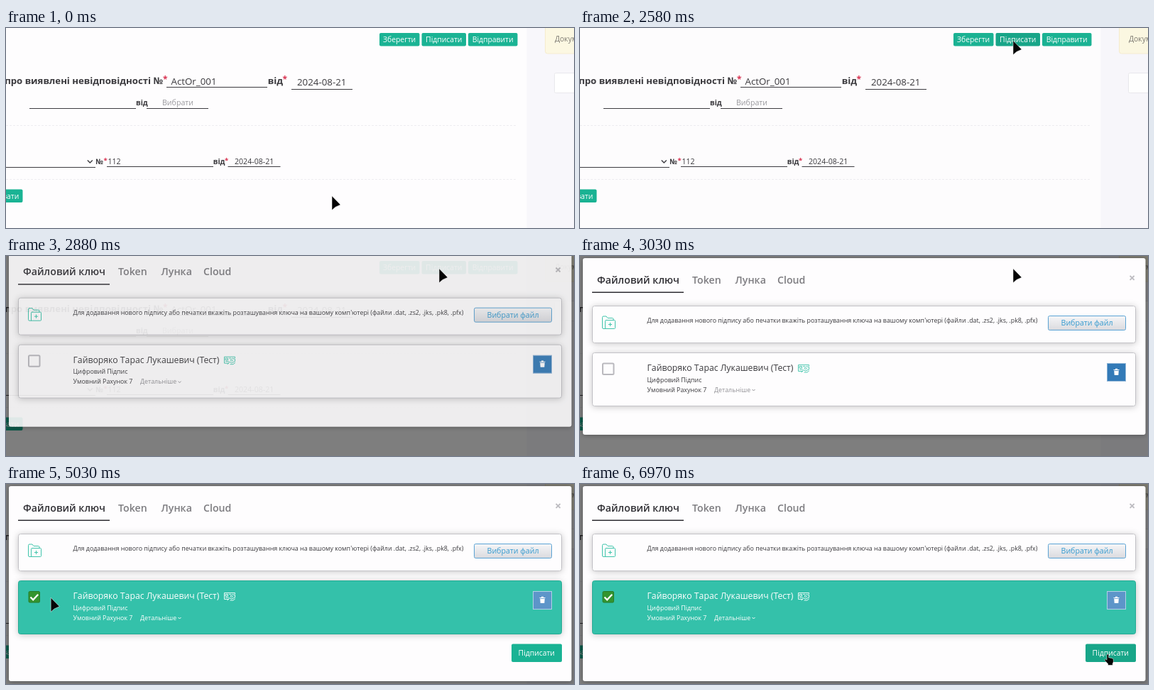
These frames come from a looping animation (800 px wide and 282 px high, 7 s). An HTML page:

```html
<!DOCTYPE html>
<html lang="uk">
<head>
<meta charset="utf-8">
<title>Підписання документа</title>
<style>
  html, body { margin: 0; width: 100%; height: 100%; overflow: hidden; background: #fefdfe; }
  svg { display: block; width: 800px; height: 282px; font: 10.4px "Open Sans", "Noto Sans", sans-serif; }
  text { fill: #3a393d; white-space: pre; }
  .bold { font-weight: 700; }
  .big { font-size: 13.3px; }
  .field { font-size: 10.6px; }
  .star { fill: #d8304f; font-weight: 700; }
  .rule { stroke: #3c3b40; fill: none; }
  .dash { stroke: #eeedf1; stroke-dasharray: 3 2; }
  .btn { fill: #1ab394; }
  .btn.hover { fill: #18a689; }
  .btnText { fill: #fff; text-anchor: middle; }
  .tab { font-size: 14.2px; font-weight: 600; fill: #7d7c80; }
  .small { font-size: 8.87px; }
  .card { fill: #fefdfe; stroke: #c3c2c7; filter: drop-shadow(0 1px 5px rgba(0,0,0,.22)); }
  .line { fill: none; stroke: #3fc4ab; stroke-linejoin: round; stroke-linecap: round; }
  .muted { fill: #929196; }
  .chevron { fill: none; stroke: #929196; }
  #box { fill: #fefdfe; stroke: #bab9be; stroke-width: 2; }
  #trash { fill: #337ab7; stroke: #8fb4d6; }
  .on .card { fill: #34c1aa; stroke: #22aa92; }
  .on text { fill: #fff; }
  .on .line, .on .chevron { stroke: #fff; }
  .on #box { fill: #33942f; stroke: #277d2a; stroke-width: 1; }
  .on #trash { fill: #5d95c9; stroke: #b3cfe7; }
</style>
</head>
<body>
<svg viewBox="0 0 800 282">
  <defs>
    <linearGradient id="silver" x2="0" y2="1">
      <stop stop-color="#f6f6f8"/><stop offset="1" stop-color="#dadade"/>
    </linearGradient>
  </defs>

  <g id="page">
    <rect width="800" height="282" fill="#fefdfe"/>
    <rect x="733.5" width="67" height="282" fill="#f8f7fb"/>
    <rect x="759.5" y="-5" width="60" height="41" rx="3" fill="#fcf8e2" stroke="#f6eccf"/>
    <text x="773" y="18.5" style="fill:#7d7a72">Документ</text>
    <rect x="772.5" y="63.5" width="50" height="28" rx="2" fill="#fff" stroke="#e9e8ec"/>

    <rect class="btn" x="526" y="7" width="56.5" height="18.5" rx="2"/>
    <rect class="btn" id="signPage" x="585.5" y="7" width="62.5" height="18.5" rx="2"/>
    <rect class="btn" x="651" y="7" width="69.5" height="18.5" rx="2"/>
    <text class="btnText" x="554" y="19.8">Зберегти</text>
    <text class="btnText" x="616.8" y="19.8">Підписати</text>
    <text class="btnText" x="685.6" y="19.8">Відправити</text>

    <text class="bold" x="221" y="79.3" text-anchor="end" font-size="13.2">про виявлені невідповідності №</text>
    <text class="star" x="221" y="77" font-size="12">*</text>
    <text class="big" x="232.5" y="79.5">ActOr_001</text>
    <text class="bold" x="368.8" y="79.3" font-size="13.2">від</text>
    <text class="star" x="389.6" y="77" font-size="12">*</text>
    <text class="big" x="410" y="80.8">2024-08-21</text>
    <text class="bold" x="183" y="109">від</text>
    <text class="field" x="220" y="109.3" style="fill:#9b9a9f">Вибрати</text>

    <path class="rule" d="M226 83.5H368M402 86.5H488M33 113.5H183M198 113.5H285M0 196.5H126M142 195.5H292M312.5 195.5H386.5"/>
    <path class="dash" d="M0 137.5H719M0 213.5H719"/>
    <path class="rule" d="M114.8 186.5l3.5 3.5 3.5-3.5" stroke-width="1.4"/>
    <text class="bold" x="126.3" y="191.8">№</text>
    <text class="star" x="137.5" y="190" font-size="9.5">*</text>
    <text class="field" x="143.5" y="191.8">112</text>
    <text class="bold" x="291.8" y="191.8">від</text>
    <text class="star" x="308" y="190" font-size="9.5">*</text>
    <text class="field" x="322" y="191.8">2024-08-21</text>

    <rect class="btn" x="-40" y="227.5" width="63.5" height="18.5" rx="2"/>
    <text x="18.3" y="240.8" text-anchor="end" style="fill:#fff">вати</text>
  </g>

  <rect id="shade" width="800" height="282"/>

  <g id="modal">
    <rect id="panel" x="4" y="3" width="792.5" height="249" rx="3" fill="#fefdfe"
          style="filter:drop-shadow(0 1px 3px rgba(0,0,0,.3))"/>
    <text class="tab" x="24" y="38.8" style="fill:#313035">Файловий ключ</text>
    <text class="tab" x="158" y="38.8">Token</text>
    <text class="tab" x="218.5" y="38.8">Лунка</text>
    <text class="tab" x="278" y="38.8">Cloud</text>
    <rect x="17" y="50.5" width="129" height="1.5" fill="#2e2d32"/>
    <path d="M774.6 27.8l6 6m0-6l-6 6" stroke="#bdbcc1" stroke-width="1.9"/>

    <rect class="card" x="17.5" y="70.5" width="765" height="52" rx="3"/>
    <path class="line" d="M35.5 102.5H33Q31.5 102.5 31.5 101V86.5Q31.5 85 33 85H37L39 87.5H45.5Q47 87.5 47 89V90.5M36.5 90.5H48.5Q49.5 90.5 49.5 91.5V101.5Q49.5 102.5 48.5 102.5H35.5V91.5Q35.5 90.5 36.5 90.5M42.5 94.3v4.4m-2.2-2.2h4.4"/>
    <text class="small" x="94.5" y="94.3">Для додавання нового підпису або печатки вкажіть розташування ключа на вашому комп'ютері (файли .dat, .zs2, .jks, .pk8, .pfx)</text>
    <rect x="659.5" y="84.5" width="109" height="20" rx="2" fill="url(#silver)" stroke="#5ba3d4"/>
    <text class="field" x="714" y="98.4" text-anchor="middle" style="fill:#3399cf">Вибрати файл</text>

    <g id="key">
      <rect class="card" x="17.5" y="136.5" width="765" height="75" rx="3"/>
      <rect id="box" x="32" y="151.5" width="15.5" height="15.5" rx="1.5"/>
      <path id="tick" d="M34.5 159.5l3.7 3.8 7-7.5" fill="none" stroke="#fff" stroke-width="2.3"/>
      <text x="94.5" y="162.3" font-size="12.25">Гайворяко Тарас Лукашевич (Тест)</text>
      <path class="line" stroke-width=".9" d="M313.5 162.5H307.5V153.5H322.5V155M309.5 155.5h3v2.5h-3zM309.5 160h4m1-4.5h2M312 164l3-3.5 2.5 1.5 5-2V156.5l-3-1-3.5 2.5 1.5 1.5 2.5-1.5M316 164h4l2.5-2"/>
      <text class="small" x="94.5" y="177.6">Цифровий Підпис</text>
      <text class="small" x="94.5" y="191.6">Умовний Рахунок 7</text>
      <text class="small muted" x="189" y="191.6">Детальніше</text>
      <path class="chevron" d="M242.5 188l2 2 2-2"/>
      <rect id="trash" x="742.5" y="151.5" width="26" height="25"/>
      <path d="M751.5 160h8v1.1h-8zM754 158.8h3v1.2h-3zM752.2 161.8h6.6l-.5 6.2h-5.6z" fill="#fff"/>
    </g>

    <g id="confirm">
      <rect class="btn" id="signModal" x="712" y="225.5" width="71" height="25.5" rx="2"/>
      <text class="btnText" x="747.3" y="242.2">Підписати</text>
    </g>
  </g>

  <g id="cursor" stroke="#fff" stroke-linejoin="round" fill="#050505" stroke-width=".5">
    <path id="arrow" d="M0-.3V19.8L5 15.4 12.2 12.2Z"/>
    <path id="hand" d="M3 5.2Q3 4 4.3 4T5.7 5.2V9Q7 8.2 8 9.4 9.3 8.7 10.2 9.9 12.4 9.6 12.3 11.8V14.5Q12 16.2 11.2 17V19.5H4.6V17.6L.3 13Q-.6 11.6.6 11.1 1.8 10.8 3 12.2Z"/>
  </g>
</svg>
<script>
  const LOOP = 7000;
  const SHADE_AT = 2580, MODAL_AT = 2750, CHECK_AT = 4650;
  const pathX = [[60, 459], [1180, 610], [3120, 610], [4400, 47], [4930, 47], [6040, 739]];
  const pathY = [[60, 237], [1180, 18], [3120, 18], [4400, 157], [4930, 157], [5720, 236]];

  const el = id => document.getElementById(id);
  const show = (id, on) => el(id).setAttribute('visibility', on ? 'inherit' : 'hidden');
  const clamp = v => Math.min(1, Math.max(0, v));
  const smooth = u => u * u * (3 - 2 * u);

  function track(keys, t) {
    let value = keys[0][1];
    for (let i = 1; i < keys.length; i++) {
      const [t0, v0] = keys[i - 1], [t1, v1] = keys[i];
      if (t >= t0) value = v0 + (v1 - v0) * smooth(clamp((t - t0) / (t1 - t0)));
    }
    return value;
  }

  function render(t) {
    const x = track(pathX, t), y = track(pathY, t);
    const over = (left, top, right, bottom) => x > left && x < right && y > top && y < bottom;
    const onPage = over(585, 7, 648, 26);
    const checked = t >= CHECK_AT;
    const onConfirm = checked && over(712, 225, 783, 251);
    const pointing = onConfirm || (onPage && t < SHADE_AT);

    el('shade').setAttribute('opacity', .5 * clamp((t - SHADE_AT) / 150));
    const slide = 1 - clamp((t - MODAL_AT) / 250);
    el('modal').setAttribute('opacity', clamp((t - MODAL_AT) / 150));
    el('modal').setAttribute('transform', `translate(0 ${-50 * slide * slide})`);

    el('panel').setAttribute('height', checked ? 275 : 249);
    el('key').setAttribute('class', checked ? 'on' : '');
    show('tick', checked);
    show('confirm', checked);
    el('signPage').classList.toggle('hover', onPage);
    el('signModal').classList.toggle('hover', onConfirm);

    el('cursor').setAttribute('transform', `translate(${x} ${y})`);
    show('arrow', !pointing);
    show('hand', pointing);
  }

  const start = performance.now();
  function frame() {
    render((performance.now() - start) % LOOP);
    requestAnimationFrame(frame);
  }
  frame();
</script>
</body>
</html>
```
